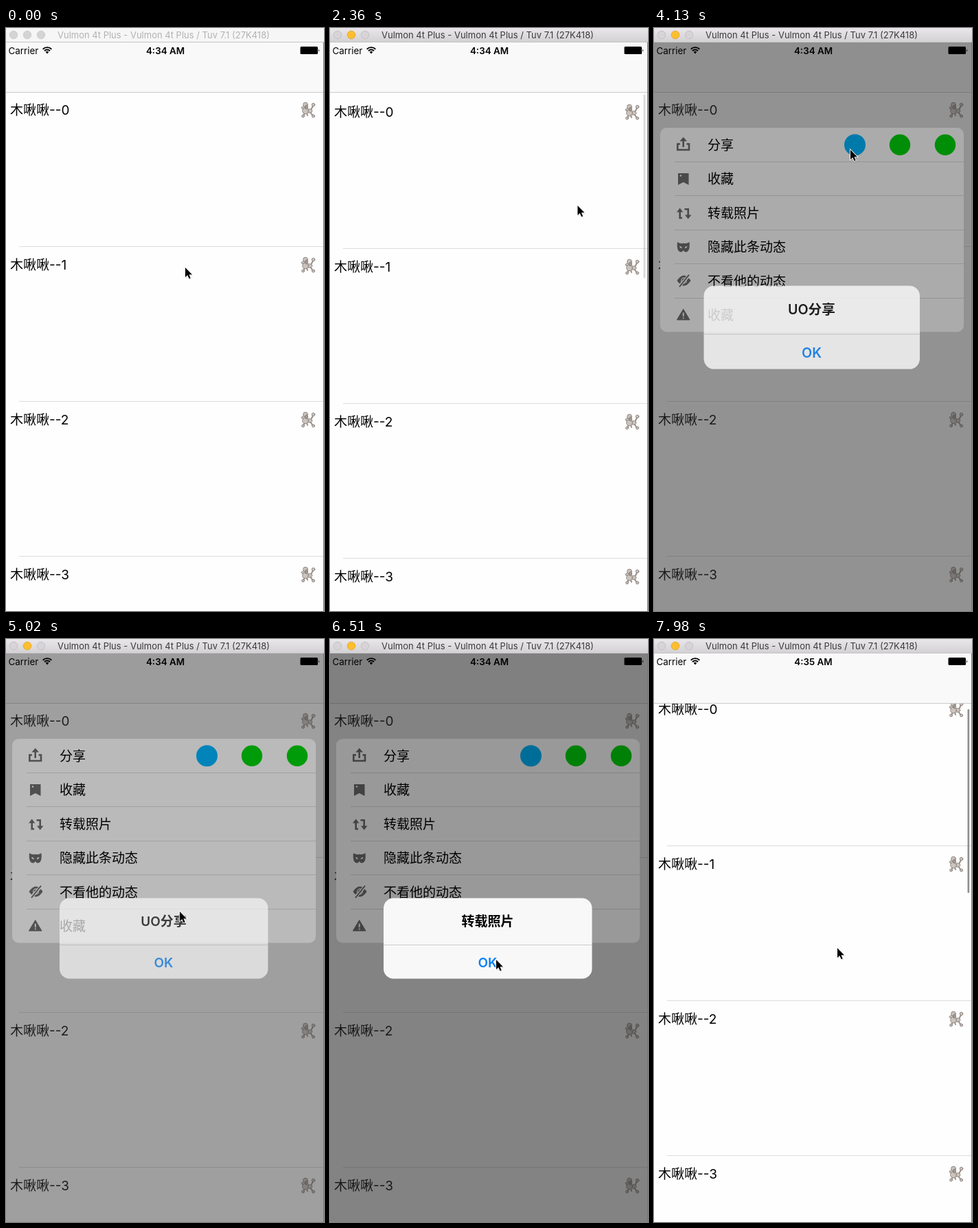
Write an HTML page that moves like this. It is 463 px wide and 847 px high and loops after 8 s.

```html
<!DOCTYPE html>
<html lang="zh-CN">
<head>
<meta charset="utf-8">
<title>List menu</title>
<style>
  html, body { margin: 0; width: 100%; height: 100%; overflow: hidden; background: #fefefe; }
  svg { display: block; width: 463px; height: 847px; font-family: Inter, "Noto Sans CJK SC", sans-serif; }
  .label { font-size: 19px; }
  .status { font-size: 13.4px; }
  .bold { font-weight: 600; }
  .mid { text-anchor: middle; }
  .hair { fill: #dcdcdc; }
  .icon { fill: #6e6e6e; }
  .line { fill: none; stroke: #6e6e6e; stroke-width: 2.6; }
  .cut { fill: #fefefe; }
</style>
</head>
<body>
<svg viewBox="0 0 463 847">
  <defs>
    <linearGradient id="chrome" x2="0" y2="1">
      <stop stop-color="#e9e7e9"/><stop offset="1" stop-color="#d2d0d2"/>
    </linearGradient>
    <g id="dog" fill="#cbc3be" stroke="#7d746f" stroke-width=".8" stroke-linecap="round">
      <path d="M444 119L447 113M435 123L433 128M438 124L439 127M443 122L447 128" fill="none" stroke="#9b918b" stroke-width="2"/>
      <path d="M434 113L430 115.5L431 117.5L436 117Z"/>
      <ellipse cx="441.500" cy="120.500" rx="4.200" ry="2.800"/>
      <circle cx="436" cy="120.500" r="4.400"/>
      <circle cx="436" cy="111.500" r="3.400"/>
      <ellipse cx="437.500" cy="115" rx="1.900" ry="3" fill="#a89d96"/>
      <circle cx="447.500" cy="111.500" r="2.300"/>
      <circle cx="432.500" cy="128" r="1.900"/>
      <circle cx="447.500" cy="128" r="2"/>
    </g>
  </defs>

  <rect width="463" height="847" fill="#fefefe"/>
  <g id="list"></g>
  <rect id="bar" x="456.500" width="2.600" height="267" rx="1.300" fill="#8e8e8e"/>
  <rect y="21" width="463" height="72" fill="#f9f9f9"/>
  <rect y="93" width="463" height="1" fill="#cbcbcb"/>
  <rect id="shade" y="21" width="463" height="826" fill="#808080" fill-opacity=".3"/>

  <g class="status">
    <text x="3.500" y="37.500">Carrier</text>
    <text id="clock" class="bold mid" x="232" y="37.500">4:34 AM</text>
    <g fill="none" stroke="#000" stroke-width="1.900">
      <path d="M53.700 30.700A9 9 0 0 1 66.300 30.700M56 33.200A5.700 5.700 0 0 1 64 33.200"/>
      <path d="M57.700 34.800A3.300 3.300 0 0 1 62.300 34.800L60 37.400Z" fill="#000" stroke="none"/>
    </g>
    <rect x="428.500" y="27" width="25.500" height="11" rx="1.500"/>
    <path d="M455 30.500Q456.800 32.500 455 34.500Z"/>
  </g>

  <g id="menu">
    <rect x="9" y="145" width="442" height="296.500" rx="9.500" fill="#fefefe"/>
    <g id="items"></g>
    <path class="line" d="M38 168.500H34.300V177H51V168.500H47.500M42.700 173V162"/>
    <path class="icon" d="M42.700 158.500L48 164.500H37.400Z"/>
    <path class="icon" d="M35 211H50.500V228L42.700 224L35 228Z"/>
    <circle class="cut" cx="39" cy="214.500" r="1.200"/>
    <path class="line" d="M41 276H37.700V266M44.500 263.300H49.700V273"/>
    <path class="icon" d="M33 267.500L37.700 261.500L42.400 267.500ZM45 271.500L49.700 277.500L54.400 271.500Z"/>
    <path class="icon" d="M34 311Q38.500 314 42.700 312.500Q47 314 51.500 311Q53 325 46 325.500Q44 325 42.700 323Q41.500 325 39.500 325.500Q32.500 325 34 311Z"/>
    <path class="cut" d="M37 317Q40 316.500 41 319.500Q38 321 37 317ZM48.500 317Q45.500 316.500 44.500 319.500Q47.500 321 48.500 317Z"/>
    <path class="icon" d="M33.500 367Q43.500 352 53.500 367Q43.500 382 33.500 367Z"/>
    <circle cx="43.500" cy="367" r="3.800" fill="none" stroke="#fefefe" stroke-width="1.200"/>
    <path d="M36.500 375.500L51.500 359" stroke="#fefefe" stroke-width="4.500"/>
    <path class="line" d="M37 376L51 358.500" style="stroke-width:2"/>
    <path class="icon" d="M42.700 408.500L52 424H33.400Z" stroke="#6e6e6e" stroke-linejoin="round"/>
    <path class="cut" d="M41.800 413.500H43.700V419H41.800ZM41.800 420.500H43.700V422.300H41.800Z"/>
    <circle cx="292.500" cy="169.800" r="15.500" fill="#00b5ff"/>
    <circle cx="358" cy="169.800" r="15.200" fill="#00d40c"/>
    <circle cx="424" cy="169.800" r="15.200" fill="#00d40c"/>
  </g>

  <rect id="dim" y="21" width="463" height="826" fill-opacity=".4"/>
  <g id="alert" class="label bold mid">
    <rect x="78" y="376.500" width="303.500" height="117" rx="14.500" fill="#f8f8f8"/>
    <rect x="78" y="444" width="303.500" height="1" fill="#cdcdcd"/>
    <text id="note" x="229.500" y="417"></text>
    <text x="229.500" y="477" fill="#0a7ff5">OK</text>
  </g>

  <rect x="462" y="21" width="1" height="826" fill="#777"/>
  <rect id="top" width="463" height="21"/>
  <rect y="20" width="463" height="1" fill="#c6c4c6"/>
  <g id="dots" stroke-width=".8">
    <circle cx="11" cy="10" r="5.800"/>
    <circle id="amber" cx="31" cy="10" r="5.800"/>
    <circle cx="51" cy="10" r="5.800"/>
  </g>
  <text id="name" class="mid" x="229.500" y="15" font-size="13">Vulmon 4t Plus - Vulmon 4t Plus / Tuv 7.1 (27K418)</text>

  <g id="cursor">
    <path d="M.5 1V15.500L4 12.300L6.300 17.500L8.700 16.400L6.400 11.400H11Z" fill="#000" fill-opacity=".2"/>
    <path d="M0 0V14L3.300 11L5.600 16.200L7.700 15.300L5.500 10.200H10Z" stroke="#fff" stroke-width="1.600" paint-order="stroke"/>
  </g>
</svg>
<script>
const $ = id => document.getElementById(id);
const LOOP = 8000;

$('list').innerHTML = [0, 1, 2, 3].map(i => `<g transform="translate(0 ${i * 225})">
  <text class="label" x="6" y="126">木啾啾--${i}</text>
  <use href="#dog"/><rect class="hair" x="19" y="317" width="443" height="1"/></g>`).join('');

$('items').innerHTML = ['分享', '收藏', '转载照片', '隐藏此条动态', '不看他的动态', '收藏'].map((s, i) =>
  `<text class="label" x="78" y="${176.700 + i * 49.500}">${s}</text>` +
  (i ? `<rect class="hair" x="30" y="${Math.floor(144.700 + i * 49.500)}" width="421" height="1"/>` : '')).join('');

// The screen refreshes in bursts: [first, last, count]
const bursts = [[140, 1160, 8], [1310, 2210, 7], [2360, 2510, 2], [2800, 3840, 8], [4130, 5170, 8],
  [5320, 5320, 1], [5910, 6510, 5], [6800, 7840, 8], [7980, 7980, 1]];
const ticks = [0];
for (const [a, b, n] of bursts)
  for (let i = 0; i < n; i++) ticks.push(Math.floor((a + (n > 1 ? (b - a) * i / (n - 1) : 0)) / 10) * 10);

// Tracks: [time, value, ...]
const pointer = [[0, 261, 348], [440, 264, 408], [590, 266, 422], [1010, 266, 290], [1160, 266, 292],
  [1460, 266, 329], [1900, 268, 422], [2060, 268, 458], [2210, 290, 395], [2510, 431, 121],
  [2800, 431, 121], [3100, 430, 141], [3400, 380, 165], [3840, 286, 177], [4280, 286, 177],
  [4430, 272, 290], [4570, 242, 440], [4720, 238, 468], [4870, 238, 468], [5020, 253, 396],
  [5170, 185, 330], [5320, 87, 270], [5910, 87, 270], [6210, 170, 390], [6360, 228, 455],
  [6510, 242, 466], [6800, 242, 466], [7100, 262, 520], [7250, 270, 560], [7400, 270, 560],
  [7700, 267, 466], [7840, 267, 466], [7980, 267, 449]];
const scroll = [[590, 0], [1010, 132], [1160, 130], [1460, 93], [1900, 0], [2060, -18], [2210, -10],
  [2360, -3], [2510, 0], [7840, 0], [7980, 17]];
const barFade = [[590, 0], [740, 1], [2060, 1], [2510, 0], [7840, 0], [7980, 1]];
const menuFade = [[2700, 0], [2900, 1], [7300, 1], [7550, 0]];
const alertFade = [[3990, 0], [4130, .82], [4280, .97], [4430, 1], [4870, 1], [5020, .68], [5170, 0],
  [5800, 0], [5910, .55], [6060, .92], [6210, 1], [6700, 1], [6950, .45], [7100, 0]];

function at(track, t, k = 1) {
  const i = track.findIndex(p => p[0] > t);
  if (i === 0) return track[0][k];
  if (i < 0) return track[track.length - 1][k];
  const a = track[i - 1], b = track[i];
  return a[k] + (b[k] - a[k]) * (t - a[0]) / (b[0] - a[0]);
}

const set = (id, name, value) => $(id).setAttribute(name, value);

function draw(time) {
  const t = ticks.filter(x => x <= time + 1).pop();
  const y = at(scroll, t), p = at(alertFade, t), menu = at(menuFade, t);
  const active = t >= 430;
  const entering = t < 4600 || (t > 5500 && t < 6500);
  const zoom = entering ? 1 + .2 * (1 - p) : 1;

  set('list', 'transform', `translate(0 ${-y})`);
  set('bar', 'y', 96.600 + Math.max(0, y) * .316);
  set('bar', 'opacity', at(barFade, t));
  set('shade', 'opacity', menu);
  set('menu', 'opacity', menu);
  set('dim', 'opacity', p);
  set('alert', 'opacity', p);
  set('alert', 'transform', `translate(229.500 435) scale(${zoom}) translate(-229.500 -435)`);
  $('note').textContent = t < 5500 ? 'UO分享' : '转载照片';
  $('clock').textContent = t < 7100 ? '4:34 AM' : '4:35 AM';

  set('top', 'fill', active ? 'url(#chrome)' : '#f6f6f6');
  set('name', 'fill', active ? '#3c3c3c' : '#b2b2b2');
  set('dots', 'fill', active ? '#d6d4d6' : '#d4d4d4');
  set('dots', 'stroke', active ? '#bebcbe' : '#cacaca');
  set('amber', 'fill', active ? '#fdbe2f' : '#d4d4d4');
  set('amber', 'stroke', active ? '#e2a325' : '#cacaca');
  set('cursor', 'transform', `translate(${at(pointer, t)} ${at(pointer, t, 2)})`);
}

const start = performance.now();
function frame(now) {
  draw(Math.max(0, now - start) % LOOP);
  requestAnimationFrame(frame);
}
draw(0);
requestAnimationFrame(frame);
</script>
</body>
</html>
```
